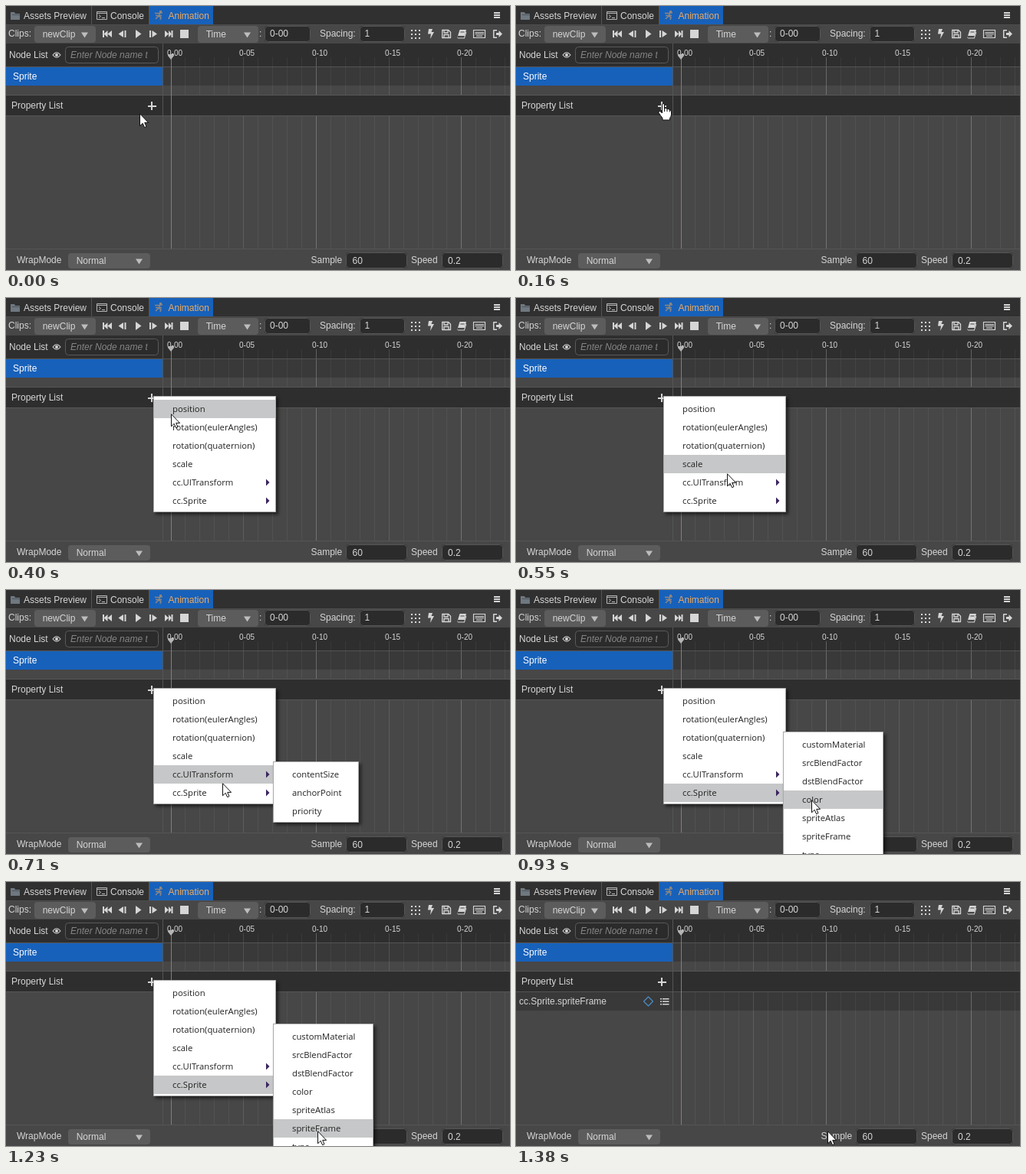
Animation, 657 px wide and 345 px high, one loop 1690 ms. Source, as an HTML page with a canvas:

```html
<!DOCTYPE html>
<html lang="en">
<head>
<meta charset="utf-8">
<style>
html, body { margin: 0; width: 100%; height: 100%; overflow: hidden; background: #474747; }
canvas { display: block; }
</style>
</head>
<body>
<canvas width="657" height="345"></canvas>
<script>
const c = document.querySelector('canvas').getContext('2d');
const UI = '12px "Liberation Sans", Arial, sans-serif';
const SMALL = '10px "Liberation Sans", Arial, sans-serif';
const ITALIC = 'italic ' + UI;
const MENU = '11.3px "Open Sans", "Noto Sans", sans-serif';
const BG = '#474747', DARK = '#2e2e2e', ROW = '#393939', BLUE = '#1761ba', INK = '#d6d6d6', EDGE = '#555555';
const LOOP = 1690;

// start, cursor x, cursor y, cursor shape, open menus, hovered row per menu
const steps = [
  [0, 174, 140, 'arrow', 0],
  [80, 188, 128, 'hand', 0],
  [160, 192, 127, 'hand', 0],
  [250, 196, 130, 'hand', 1, -1],
  [400, 215, 151, 'arrow', 1, 0],
  [480, 249, 195, 'arrow', 1, 2],
  [550, 275, 229, 'arrow', 1, 3],
  [630, 280, 243, 'arrow', 1, 4],
  [710, 282, 252, 'arrow', 2, 4, -1],
  [790, 303, 260, 'arrow', 1, 5],
  [870, 344, 263, 'arrow', 3, 5, -1],
  [930, 385, 274, 'arrow', 3, 5, 3],
  [1010, 389, 285, 'arrow', 3, 5, 3],
  [1080, 395, 302, 'arrow', 3, 5, 4],
  [1150, 402, 318, 'arrow', 3, 5, 5],
  [1230, 406, 325, 'arrow', 3, 5, 5],
  [1380, 406, 325, 'arrow', 0]
];

const mainMenu = ['position', 'rotation(eulerAngles)', 'rotation(quaternion)', 'scale', 'cc.UITransform', 'cc.Sprite'];
const transformMenu = ['contentSize', 'anchorPoint', 'priority'];
const spriteMenu = ['customMaterial', 'srcBlendFactor', 'dstBlendFactor', 'color', 'spriteAtlas', 'spriteFrame', 'type', 'sizeMode', 'trim'];

function rect(x, y, w, h, color) {
  c.fillStyle = color;
  c.fillRect(x, y, w, h);
}

function round(x, y, w, h, r, color, border) {
  c.beginPath();
  c.roundRect(x, y, w, h, r);
  c.fillStyle = color;
  c.fill();
  if (!border) return;
  c.beginPath();
  c.roundRect(x + .5, y + .5, w - 1, h - 1, r);
  c.strokeStyle = border;
  c.lineWidth = 1;
  c.stroke();
}

function text(s, x, y, color = INK, font = UI) {
  c.font = font;
  c.fillStyle = color;
  c.fillText(s, x, y);
}

function fill(d, color = INK, x = 0, y = 0) {
  c.save();
  c.translate(x, y);
  c.fillStyle = color;
  c.fill(new Path2D(d), 'evenodd');
  c.restore();
}

function line(d, color = INK, width = 1, x = 0, y = 0) {
  c.save();
  c.translate(x, y);
  c.strokeStyle = color;
  c.lineWidth = width;
  c.lineJoin = 'round';
  c.stroke(new Path2D(d));
  c.restore();
}

function input(x, y, w, h, value, tx, base) {
  round(x, y, w, h, 4, '#2b2b2b', EDGE);
  text(value, tx, base);
}

function select(x, y, w, h, value, base) {
  round(x, y, w, h, 4, '#5c5c5c');
  text(value, x + 10.7, base);
  fill('M-4.5-2.500h9L0 4.500z', '#bdbdbd', x + w - 14.5, y + h / 2);
}

function tabs() {
  rect(0, 0, 657, 24, '#303030');
  rect(111, 0, 1, 24, EDGE);
  rect(186, 0, 1, 24, EDGE);
  rect(187, 0, 83, 24, BLUE);
  fill('M6 8h5l1 2h6v8H6z', '#6f7880');
  rect(8, 11, 10, 1, '#4d565e');
  text('Assets Preview', 23, 17);
  line('M118.5 7.5h13v10h-13zM118.5 9.5h13M121 11.5l2.5 2-2.5 2M125 15.5h4', '#b8b8b8');
  text('Console', 136, 17);
  line('M194 9.5h6l4-1M195 12.5h8M201 9l-2 4 3 2-1 3M199 13l-4 4', '#8b8580', 1.6);
  fill('M200 6h3v3h-3z', '#8b8580');
  text('Animation', 211.5, 17, '#efab60');
  for (let y = 8; y < 16; y += 3) rect(636, y, 8, 2, INK);
}

function toolbar() {
  rect(0, 24, 657, 25, BG);
  rect(0, 24, 657, 1, '#4d4d4d');
  text('Clips:', 3, 40);
  select(37, 26, 80, 22, 'newClip', 41);
  fill('M126 32h2v9h-2zM132.5 32v9l-5-4.5zM138 32v9l-5.5-4.5z');
  fill('M153 32v9l-6.5-4.5zM154.5 32h2v9h-2z');
  fill('M169 31l7.5 5.5-7.5 5.5z');
  fill('M187 32h2v9h-2zM190.5 32l6.5 4.5-6.5 4.5z');
  fill('M207 32l5 4.5-5 4.5zM212 32l4 4.5-4 4.5zM215.5 32h2v9h-2z');
  rect(227, 31, 11, 11, INK);
  select(250, 26, 79, 22, 'Time', 41);
  text(':', 330, 40);
  input(337, 26, 60, 21, '0-00', 344, 40);
  text('Spacing:', 409, 40);
  input(461, 26, 59, 21, '1', 467.5, 40);
  for (let i = 0; i < 9; i++) rect(528 + i % 3 * 5, 31 + Math.floor(i / 3) * 5, 2, 2, INK);
  fill('M551 30h5l-1.5 4h3.5l-5 9 1-6.500h-4z');
  line('M568.7 31.500h8l2.800 2.800v7.200h-10.800zM571 31.500v3.500h5v-3.500M571 41.500v-4h6v4', INK, 1.3);
  fill('M591.500 31h8.500l-2.300 8h-8.700zM588.500 39.500l.5 2h8l2.500-8 .8 1-2.500 8h-8.500q-1.500-1-.8-3zM592.500 33.500h5v1h-5.300z');
  line('M609.500 31.500h15v10h-15z', INK, 1.2);
  line('M611.500 34.500h11.500M611.500 36.500h11.500', INK, 1.2);
  rect(613, 38.5, 8, 1.2, INK);
  line('M640 31.700h-4.300v9.600h4.300', INK, 1.5);
  fill('M639 35h3.500v-3l4.500 4.500-4.500 4.500v-3h-3.500z');
}

function grid(filled) {
  rect(0, 49, 657, 31, DARK);
  rect(205, 80, 452, 24, ROW);
  if (filled) rect(0, 144, 657, 24, ROW);
  for (let i = 0; i < 24; i++) {
    const x = Math.floor(215 + i * 18.945);
    const alpha = i % 10 === 0 ? .24 : i % 5 === 0 ? .12 : .055;
    rect(x, 67, 1, 250, `rgba(255,255,255,${alpha})`);
    if (i % 5 === 0) text('0-' + String(i).padStart(2, '0'), x - 5, 64.5, INK, SMALL);
  }
}

function panel(filled) {
  rect(0, 25, 657, 320, BG);
  grid(filled);
  rect(0, 79, 657, 1, EDGE);
  text('Node List', 4, 68);
  line('M61 64q5-6.500 10 0q-5 6.500-10 0z', INK, 1.1);
  fill('M64 64a2 2 0 1 0 4 0a2 2 0 1 0-4 0');
  round(77, 53, 122, 22, 4, '#2b2b2b', '#5a5a5a');
  c.save();
  c.beginPath();
  c.rect(78, 54, 106.5, 20);
  c.clip();
  text('Enter Node name t', 84, 68, '#858585', ITALIC);
  c.restore();
  rect(0, 80, 204, 24, BLUE);
  text('Sprite', 9, 96, '#ffffff');
  rect(0, 117, 657, 26, DARK);
  rect(0, 116, 657, 1, EDGE);
  rect(0, 143, 657, 1, EDGE);
  text('Property List', 7, 134);
  rect(185, 130, 11, 2, INK);
  rect(189, 125, 2, 11, INK);
  rect(204, 49, 1, 268, EDGE);
  rect(215, 67, 1, 250, '#907878');
  fill('M211 63h8v2l-4 5-4-5z', '#b5b5b5');
  if (filled) {
    text('cc.Sprite.spriteFrame', 4, 160);
    line('M172.500 150l6 6-6 6-6-6z', '#4b8fc9', 1.1);
    for (let y = 152; y < 161; y += 3.5) {
      rect(188, y, 2, 1.5, INK);
      rect(191, y, 8.5, 1.5, INK);
    }
  }
}

function footer() {
  rect(0, 317, 657, 1, EDGE);
  text('WrapMode', 14, 336);
  select(81, 323, 107, 20, 'Normal', 337);
  text('Sample', 397.5, 336);
  input(443, 322, 80, 21, '60', 451.5, 337);
  text('Speed', 528, 336);
  input(568, 322, 80, 21, '0.2', 576, 337);
}

function menu(x, y, w, items, hover) {
  const h = items.length * 24 + 8;
  c.save();
  c.shadowColor = 'rgba(0,0,0,.55)';
  c.shadowBlur = 4;
  c.shadowOffsetX = c.shadowOffsetY = 3;
  rect(x, y, w, h, '#a9a9a9');
  c.restore();
  rect(x + 1, y + 1, w - 2, h - 2, '#ffffff');
  items.forEach((label, i) => {
    const top = y + 5 + i * 24;
    if (i === hover) rect(x + 1, top, w - 2, 24, '#c6c7c8');
    text(label, x + 25, top + 16, '#222222', MENU);
    if (label.startsWith('cc.')) fill('M0-4.500L4.500 0 0 4.500z', '#3c2560', x + 147, top + 12);
  });
}

function cursor(x, y, shape) {
  const d = shape === 'hand'
    ? 'M-1.500 11V2Q-1.500.5 0 .5T1.500 2V7.500Q2 6 3.500 6.500T5 8Q6 7 7 7.500T8.300 9Q10.500 8.500 10.500 11V15Q10 18 8.500 19.500V22H-1V19.500Q-3 17-6 12.500Q-6.500 10.500-4.500 10.500Q-3 11-1.500 13z'
    : 'M.5 .8V16.800L4.200 13.300 6.600 18.700 9 17.600 6.700 12.400H11.600z';
  fill(d, '#ffffff', x, y);
  line(d, '#111111', 1, x, y);
  if (shape === 'hand') line('M1.500 7v4M5 8v3M8.300 9v2.500', '#111111', 1, x, y);
}

function draw(now) {
  const t = now % LOOP;
  const [start, x, y, shape, open, row, subRow] = steps.findLast(s => s[0] <= t);
  panel(start >= 1380);
  tabs();
  toolbar();
  footer();
  if (open) menu(192, 128, 160, mainMenu, row);
  if (open === 2) menu(348, 224, 112, transformMenu, subRow);
  if (open === 3) menu(348, 185, 131, spriteMenu, subRow);
  cursor(x, y, shape);
}

const begin = performance.now();
function tick() {
  draw(performance.now() - begin);
  requestAnimationFrame(tick);
}
tick();
</script>
</body>
</html>
```
